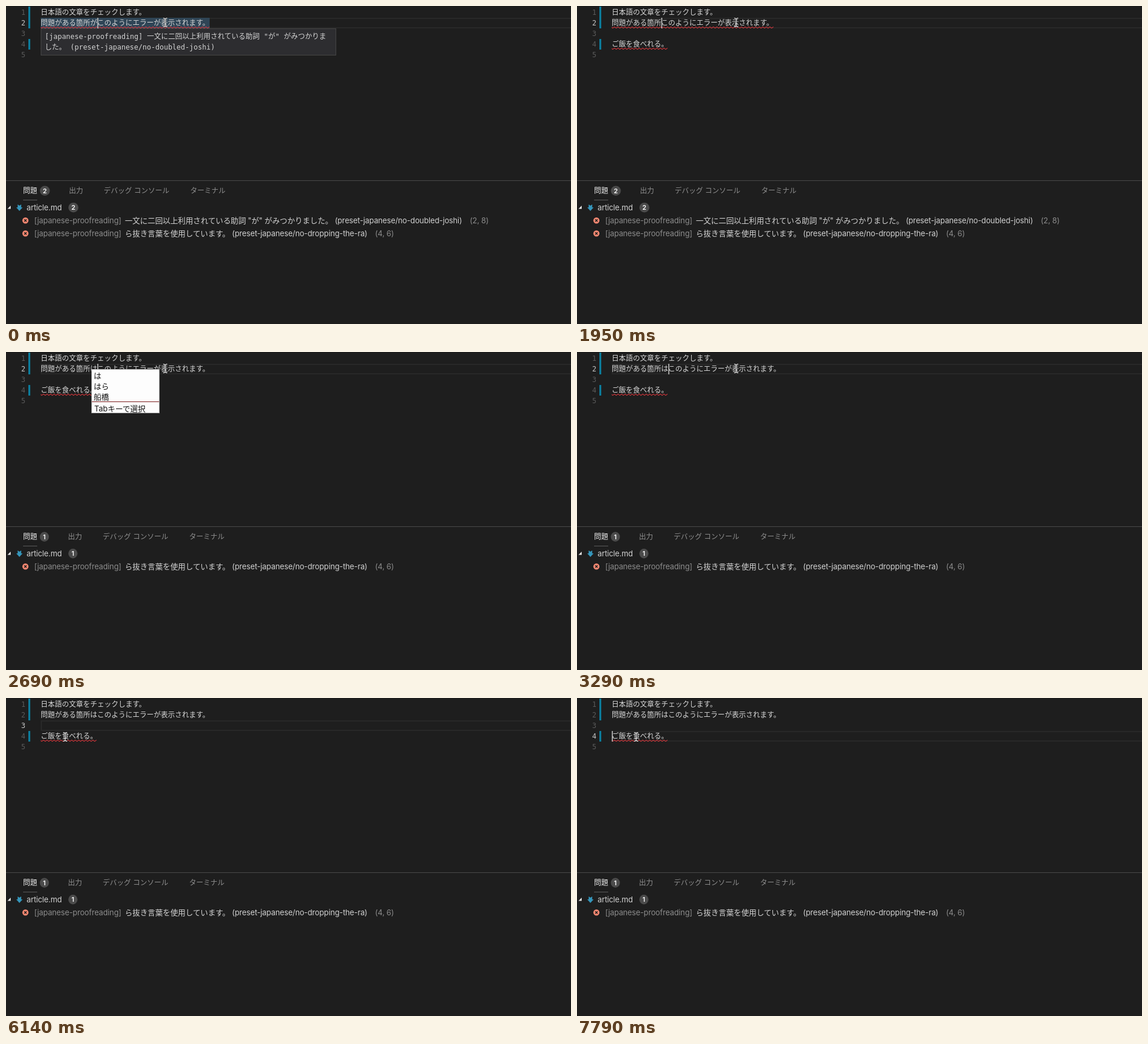
An HTML page that plays this animation: 960x540 px, repeating every 8000 ms.

```html
<!DOCTYPE html>
<html lang="ja">
<head>
<meta charset="utf-8">
<title>Proofreading in an editor</title>
<style>
  html, body { margin: 0; width: 100%; height: 100%; overflow: hidden; background: #1e1e1e; }
  svg { display: block; width: 960px; height: 540px; }
  text { white-space: pre; }
  .code { font: 500 12px "Noto Sans CJK JP", "Noto Sans CJK", "Noto Sans", sans-serif; fill: #d8d8d8; }
  .mono { font: 12px "DejaVu Sans Mono", "Noto Sans CJK JP", "Noto Sans CJK", monospace; fill: #d4d4d4; }
  .ui { font: 13px Inter, "Noto Sans CJK JP", "Noto Sans CJK", sans-serif; letter-spacing: -.13px; fill: #d2d2d2; }
  .tab { font-size: 12px; letter-spacing: 0; fill: #8f8f8f; }
  .on { fill: #ececec; }
  .dim { fill: #8c8c8c; }
  .count { font-size: 11px; font-weight: 600; letter-spacing: 0; fill: #fff; text-anchor: middle; }
  .ime { fill: #111; letter-spacing: 0; }
  .wave { fill: none; stroke: #e0383d; stroke-width: 1.1; }
</style>
</head>
<body>
<svg id="stage" viewBox="0 0 960 540"></svg>
<script>
const stage = document.getElementById('stage');
const LOOP = 8000, LEFT = 59, CELL = 12, ROW = 18;

function add(parent, tag, attrs = {}, content) {
  const node = document.createElementNS('http://www.w3.org/2000/svg', tag);
  for (const key in attrs) node.setAttribute(key, attrs[key]);
  if (content !== undefined) node.textContent = content;
  parent.appendChild(node);
  return node;
}
const group = (parent = stage) => add(parent, 'g');
const rect = (parent, x, y, width, height, fill) => add(parent, 'rect', { x, y, width, height, fill });
const path = (parent, d, attrs) => add(parent, 'path', { d, ...attrs });
const label = (parent, x, y, content, cls) => add(parent, 'text', { x, y, class: cls }, content);
const show = (node, on) => { node.style.display = on ? '' : 'none'; };
const set = (node, attrs) => { for (const key in attrs) node.setAttribute(key, attrs[key]); };
const rowTop = line => 2 + ROW * (line - 1);
const baseline = line => ROW * line - 3;

function wave(cells, line) {
  const end = LEFT + cells * CELL, y = rowTop(line) + 15;
  let d = `M${LEFT} ${y + 1.2}L${LEFT + 1.7} ${y + 2.6}`;
  for (let x = LEFT + 4.7, up = true; x < end; x += 3, up = !up) d += `L${x} ${y + (up ? .4 : 2.6)}`;
  return d;
}

function badge(parent, y) {
  const box = add(parent, 'rect', { y: y - 8, height: 16.5, rx: 8.2, fill: '#4b4b4b' });
  const num = label(parent, 0, y + 4.2, '', 'ui count');
  return (n, x) => {
    const w = n > 1 ? 17 : 15.5;
    set(box, { x: x - w / 2, width: w });
    num.setAttribute('x', x);
    num.textContent = n;
  };
}

function tip(y, lines) {
  const g = group();
  add(g, 'rect', { x: LEFT + .5, y: y + .5, width: 501, height: 45, fill: '#2d2d30', stroke: '#454545' });
  lines.forEach((s, i) => label(g, 66, y + 18 + ROW * i, s, 'mono'));
  return g;
}

function problem(y, message, place, placeX) {
  const g = group();
  add(g, 'circle', { cx: 33, cy: y, r: 5.2, fill: '#f48771' });
  path(g, `M31 ${y - 2}l4 4m0 -4l-4 4`, { stroke: '#1e1e1e', 'stroke-width': 1.4 });
  label(g, 48, y + 4.7, '[japanese-proofreading]', 'ui dim');
  label(g, 202, y + 4.7, message, 'ui');
  label(g, placeX, y + 4.7, place, 'ui dim');
  return g;
}

// Editor
rect(stage, 0, 0, 960, 540, '#1e1e1e');
rect(stage, 0, 0, 960, 1, '#191919');
const current = add(stage, 'rect', { x: LEFT + 1, width: 910, height: 16, fill: 'none', stroke: '#282828', 'stroke-width': 2 });
const hover = rect(stage, LEFT, 0, 0, ROW, '#202a35');
rect(stage, 38, 1, 3.2, 37, '#0c7d9d');
rect(stage, 38, 56, 3.2, ROW, '#0c7d9d');
const numbers = [1, 2, 3, 4, 5].map(n => label(stage, 25.7, baseline(n), n, 'mono'));
label(stage, LEFT, baseline(1), '日本語の文章をチェックします。', 'code');
const sentence = label(stage, LEFT, baseline(2), '', 'code');
label(stage, LEFT, baseline(4), 'ご飯を食べれる。', 'code');
const wave2 = path(stage, '', { class: 'wave' });
path(stage, wave(8, 4), { class: 'wave' });
const caret = rect(stage, 0, 0, 1.6, ROW, '#c4c4c2');

const tips = [
  tip(38, ['[japanese-proofreading] 一文に二回以上利用されている助詞 "が" がみつかりま', 'した。 (preset-japanese/no-doubled-joshi)']),
  tip(12, ['[japanese-proofreading] ら抜き言葉を使用しています。 (preset-japanese/no', '-dropping-the-ra)'])
];

// Input method candidates
const popup = group();
rect(popup, 145, 29, 116, 75, '#a8a8a8');
rect(popup, 146, 30, 114, 73, '#fdfdfd');
['は', 'はら', '船橋'].forEach((s, i) => label(popup, 149, 45 + ROW * i, s, 'ui ime'));
rect(popup, 146, 84, 114, 1, '#7a1a1a');
label(popup, 150, 100.5, 'Tabキーで選択', 'ui ime');

// Problems panel
rect(stage, 0, 296, 960, 1, '#4a4a4a');
label(stage, 29, 318, '問題', 'ui tab on');
rect(stage, 29, 329, 24, 1, '#5c5c5c');
const tabCount = badge(stage, 313.5);
const tabs = group();
label(tabs, 107, 318, '出力', 'ui tab');
label(tabs, 166, 318, 'デバッグ コンソール', 'ui tab');
label(tabs, 313, 318, 'ターミナル', 'ui tab');
path(stage, 'M8 339v5.5h-5.5z', { fill: '#e0e0e0' });
path(stage, 'M19.8 337l3 2 3 -2v5h2.4l-5.4 6 -5.4 -6h2.4z', { fill: '#3596bb' });
label(stage, 35, 346.7, 'article.md', 'ui');
const fileCount = badge(stage, 342);
const doubled = problem(364.3, '一文に二回以上利用されている助詞 "が" がみつかりました。 (preset-japanese/no-doubled-joshi)', '(2, 8)', 788);
const dropped = problem(386.3, 'ら抜き言葉を使用しています。 (preset-japanese/no-dropping-the-ra)', '(4, 6)', 627);

// Pointer
const mouse = group();
const beam = 'M-3.5 -7.3Q-.6 -7.3 0 -5.8Q.6 -7.3 3.5 -7.3M0 -5.8V5.8M-3.5 7.3Q-.6 7.3 0 5.8Q.6 7.3 3.5 7.3M-1.6 2.5H1.6';
path(mouse, beam, { fill: 'none', stroke: '#1a1a1a', 'stroke-width': 2.6, opacity: .7 });
path(mouse, beam, { fill: 'none', stroke: '#f4f4f4', 'stroke-width': 1.2 });

// Each step holds only what changes at that time
const steps = [
  [0, { line: 2, col: 8, blink: true, mark: 'が', wavy: true, tip: 0, tabs: 2, file: 2, ime: false, at: [270.5, 28] }],
  [450, { blink: false }],
  [1050, { blink: true }],
  [1500, { blink: false }],
  [1950, { blink: true, col: 7, mark: '', tip: -1 }],
  [2100, { wavy: false, tabs: 1 }],
  [2390, { blink: false }],
  [2540, { blink: true, col: 8, mark: 'ｈ', ime: true }],
  [2690, { mark: 'は', file: 1 }],
  [3290, { ime: false }],
  [3740, { blink: false }],
  [4340, { blink: true }],
  [4640, { line: 3, col: 0 }],
  [5090, { blink: false }],
  [5240, { at: [268.5, 35] }],
  [5390, { at: [201, 39] }],
  [5540, { at: [147.5, 54] }],
  [5690, { blink: true, at: [114, 58] }],
  [5840, { at: [99.5, 67] }],
  [5990, { at: [99.5, 66] }],
  [6140, { blink: false, at: [100.5, 66] }],
  [6290, { tip: 1 }],
  [7790, { tip: -1, line: 4, blink: true }]
];

function draw(s) {
  sentence.textContent = `問題がある箇所${s.mark}このようにエラーが表示されます。`;
  wave2.setAttribute('d', wave(23 + s.mark.length, 2));
  show(wave2, s.wavy);
  current.setAttribute('y', rowTop(s.line) + 1);
  numbers.forEach((n, i) => { n.style.fill = i + 1 === s.line ? '#c6c6c6' : '#5a5a5a'; });
  set(caret, { x: LEFT + s.col * CELL + .2, y: rowTop(s.line) });
  show(caret, s.blink);
  tips.forEach((g, i) => show(g, i === s.tip));
  show(hover, s.tip >= 0);
  set(hover, s.tip === 0
    ? { y: rowTop(2), width: 24 * CELL - 1, fill: '#2f4556' }
    : { y: rowTop(4), width: 8 * CELL, fill: '#202a35' });
  show(popup, s.ime);
  tabCount(s.tabs, s.tabs > 1 ? 66 : 65.2);
  tabs.setAttribute('transform', `translate(${s.tabs > 1 ? 0 : -1.7})`);
  fileCount(s.file, s.file > 1 ? 114.5 : 113.7);
  show(doubled, s.file > 1);
  dropped.setAttribute('transform', `translate(0 ${s.file > 1 ? 0 : -22})`);
  mouse.setAttribute('transform', `translate(${s.at})`);
}

const start = performance.now();
let shown = -1;
function tick() {
  const t = (performance.now() - start) % LOOP;
  const past = steps.filter(([at]) => at <= t);
  if (past.length !== shown) {
    shown = past.length;
    draw(Object.assign({}, ...past.map(step => step[1])));
  }
  requestAnimationFrame(tick);
}
tick();
</script>
</body>
</html>
```
